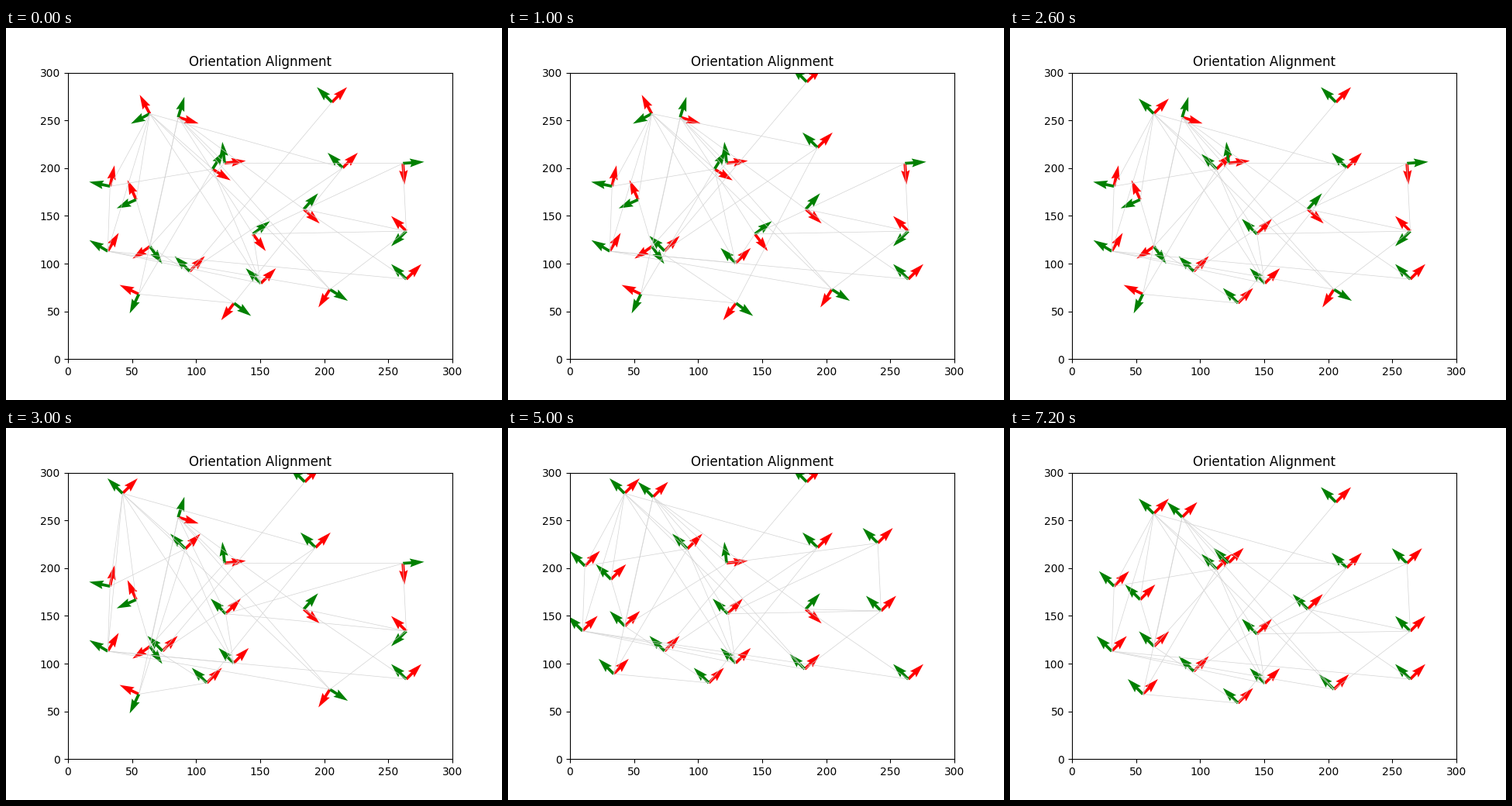
Recreate the animation shown at these times as a matplotlib script. Size 640 px wide and 480 px high, loop 8000 ms.

```python
import numpy as np
import matplotlib.pyplot as plt
from matplotlib.animation import FuncAnimation
from matplotlib.collections import LineCollection

FRAMES = 8
STEP = 30
GOAL = 45  # shared heading in degrees
ANCHOR = 9  # wave number of a node that never moves

# name: x, y, starting heading, wave in which the node aligns
NODES = {
    "A": (206, 269, GOAL, 0), "B": (63.8, 257, 118, 1),
    "C": (86, 253.3, -17, 2), "D": (32.8, 181, 78, 2),
    "E": (53.2, 167, 114, 2), "F": (31, 113, 59, 2),
    "G": (64, 118, 215, 2), "H": (55.3, 68, 154.5, 2),
    "I": (95, 92, GOAL, 0), "J": (129.6, 58.6, 233, 1),
    "K": (112.8, 199, -32, 1), "L": (122.2, 205.3, 6, 3),
    "M": (144.3, 131, -53, 1), "N": (150.5, 79.3, GOAL, 0),
    "O": (204.4, 73, 237.5, 2), "P": (184, 157, -42, 3),
    "Q": (264, 134, 135, 2), "R": (264, 83.7, GOAL, ANCHOR),
    "S": (261.4, 205, -86, 2), "T": (214.4, 200.3, GOAL, 0),
}
EDGES = ("AI BT BK BN BO BD BE BF CG CH CM CO CL CP DK DF EG FN FO FR "
         "GJ GL HJ HK IT JT KN LS MN MS MQ OQ PQ PR QS").split()

names = list(NODES)
table = np.array([NODES[name] for name in names])
home, start, wave = table[:, :2], table[:, 2], table[:, 3]
links = np.array([[names.index(end) for end in edge] for edge in EDGES])


def unit(degrees):
    angle = np.radians(degrees)
    return np.cos(angle), np.sin(angle)


def state(frame):
    """Positions and headings: aligned nodes hop out on odd frames and return."""
    frame = min(frame, 6)
    heading = np.where(2 * wave <= frame, GOAL, start)
    hop = (2 * wave < frame) & (frame % 2 == 1)
    offset = STEP * np.array(unit(GOAL + 90))
    return home + hop[:, None] * offset, heading


fig, ax = plt.subplots(figsize=(6.4, 4.8), dpi=100)
ax.set(xlim=(0, 300), ylim=(0, 300), title="Orientation Alignment")


def arrows(color):
    return ax.quiver(*home.T, *unit(start), color=color, scale=18, width=0.0075)


forward, side = arrows("red"), arrows("green")
web = LineCollection(home[links], colors="lightgray", linewidths=0.5, zorder=2)
ax.add_collection(web, autolim=False)


def update(frame):
    points, heading = state(frame)
    for quiver, turn in ((forward, 0), (side, 90)):
        quiver.set_offsets(points)
        quiver.set_UVC(*unit(heading + turn))
    web.set_segments(points[links])
    return forward, side, web


animation = FuncAnimation(fig, update, frames=FRAMES, interval=1000,
                          repeat=True, repeat_delay=0)
plt.show()
```
